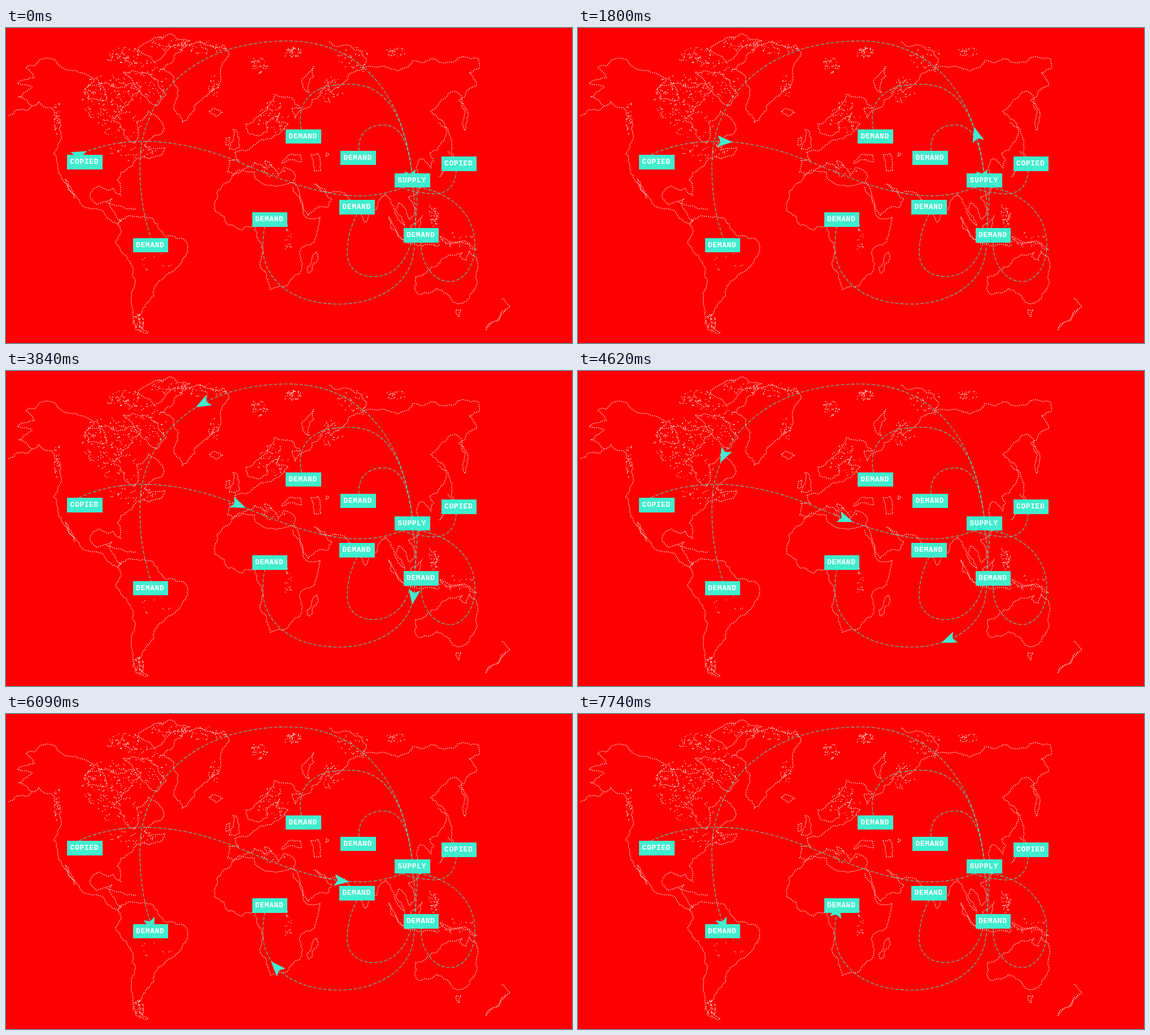
Recreate the animation shown at these times as an HTML page. Size 1002 by 559 pixels, loop 9 s.

```html
<!DOCTYPE html>
<html lang="en">
<head>
<meta charset="utf-8">
<title>Supply and demand map</title>
<style>
html, body { margin: 0; width: 100%; height: 100%; overflow: hidden; background: #f00; }
#stage { position: relative; width: 1002px; height: 559px; overflow: hidden; background: #f00; }
svg { position: absolute; left: 0; top: 0; }
#map { fill: none; stroke: #fff0df; stroke-width: 1.3; stroke-dasharray: 1.7 1.9; }
#specks { stroke-dasharray: none; }
#routes { fill: none; stroke: #48dcc0; stroke-width: 1.1; stroke-dasharray: 6 3; }
.arrow {
  position: absolute; left: 0; top: 0; width: 27px; height: 21px; background: #40edce;
  clip-path: polygon(100% 50%, 0 0, 21% 50%, 0 100%);
  animation: 9s linear infinite;
}
.label {
  position: absolute; width: 62.5px; height: 25.5px; background: #40edce; color: #fff;
  font: bold 13px/26px "Liberation Mono", monospace; letter-spacing: .6px;
  text-indent: 5.5px; white-space: nowrap;
}
#a1 { animation-name: west; }
#a2 { animation-name: north; }
#a3 { animation-name: south; }
@keyframes west {
  0%, .5% { offset-distance: 11px; }
  10.667% { offset-distance: 79.6px; }
  20% { offset-distance: 143.5px; }
  31% { offset-distance: 219px; }
  42.667% { offset-distance: 300.3px; }
  60.333% { offset-distance: 436.5px; }
  76% { offset-distance: 556.5px; }
  83% { offset-distance: 604px; }
  86%, 100% { offset-distance: 638px; }
}
@keyframes north {
  0%, 16% { offset-distance: 2px; }
  20% { offset-distance: 83px; }
  31% { offset-distance: 311px; }
  42.667% { offset-distance: 525px; }
  52.333% { offset-distance: 672px; }
  60.333% { offset-distance: 821px; }
  63.9%, 100% { offset-distance: 887px; }
}
@keyframes south {
  0%, 31.2% { offset-distance: 2px; }
  42.667% { offset-distance: 138px; }
  60.333% { offset-distance: 352px; }
  76% { offset-distance: 525px; }
  77.3%, 100% { offset-distance: 540px; }
}
</style>
</head>
<body>
<div id="stage">
<svg width="1002" height="559" viewBox="0 0 1002 559">
  <g id="map">
    <!-- North America -->
    <polyline points="4,156 38,146 46,138 22,122 46,105 20,99 50,88 35,70 86,56 94,66 148,86 232,98 238,110 206,140 190,165 228,205 232,165 252,147 280,180 246,210 281,212 278,220 240,228 215,250 197,270"/>
    <polyline points="197,270 203,297 190,284 165,280 152,290 150,303 160,313 188,303 184,315 195,335 205,342 198,348 132,312 105,268 122,303 93,258 98,190 82,142 58,130 46,138"/>
    <polyline points="178,309 207,317 230,321"/>
    <polygon points="232,42 258,22 295,12 326,22 280,48 262,62"/>
    <polygon points="208,78 240,80 284,118 268,138 240,118"/>
    <polygon points="140,108 172,104 178,128 146,126"/>
    <polygon points="272,74 300,45 345,25 385,30 395,45 380,70 375,105 335,135 312,168 297,145 305,110 297,85"/>
    <polygon points="360,148 370,143 383,150 372,157"/>
    <!-- South America -->
    <polygon points="198,348 215,334 245,335 268,348 285,370 318,378 322,388 308,420 285,437 262,475 247,490 235,530 252,541 230,535 222,490 225,430 194,380 204,360"/>
    <!-- Africa -->
    <polygon points="510,276 535,338 556,336 522,392 522,412 500,455 468,464 455,430 455,395 440,352 395,350 370,325 372,305 400,262 440,256 442,268 495,277"/>
    <polygon points="550,398 553,408 537,435 533,425"/>
    <!-- Europe -->
    <polygon points="395,215 413,212 410,185 402,180 402,200"/>
    <polygon points="390,196 396,193 396,206 389,208"/>
    <polyline points="510,275 512,261 492,248 482,262 458,235 462,250 440,238 402,260 392,255 395,235 411,235 405,220 452,198 482,189 500,170 478,165 485,150 460,170 462,184 452,190 428,185 425,170 445,158 475,118 507,124 522,142 506,142 512,160"/>
    <polygon points="488,240 500,225 522,225 523,238"/>
    <polygon points="540,225 552,222 558,253 545,254"/>
    <polygon points="567,222 572,224 566,228"/>
    <polygon points="545,68 523,95 537,115 535,100"/>
    <!-- Asia -->
    <polyline points="512,160 556,120 570,95 575,115 605,88 665,68 682,73 760,55 815,52 837,56 838,72 820,80 834,100 802,128 817,165 812,182 795,112 752,148 780,185 750,222"/>
    <polyline points="750,222 757,235 752,248 735,232 728,243 740,272 725,295 712,300 724,322 715,340 695,310 690,322 706,352 688,325 672,295 636,345 622,310 595,292 560,290 545,277 577,303 570,318 535,333 507,282"/>
    <polyline points="765,168 792,225 795,240 766,264 789,232 782,218"/>
    <polyline points="572,25 638,55 632,78"/>
    <!-- Islands and Oceania -->
    <polygon points="678,335 710,378 698,370"/>
    <polyline points="708,381 765,389"/>
    <polygon points="716,352 737,333 734,368 720,366"/>
    <polyline points="750,314 763,340 752,342"/>
    <polygon points="768,370 812,378 832,393 785,382"/>
    <polygon points="725,442 745,432 775,408 808,398 803,405 815,412 820,395 834,450 815,485 800,490 775,470 762,462 732,473 725,465"/>
    <polygon points="797,500 806,500 802,513"/>
    <polyline points="878,480 892,495 850,537 884,498"/>
    <path id="specks"/>
  </g>
  <g id="routes">
    <path id="r1" d="M121,229 C196,190 300,190 420,241 C530,288 620,318 705,282 C715,278 730,270 740,266"/>
    <path id="r2" d="M720,270 C706,112 622,23 500,23 C330,23 236,124 237,245 C237,300 245,340 261,386"/>
    <path id="r3" d="M717,264 C728,320 727,365 721,402 C712,460 650,490 590,490 C500,490 452,440 455,385 C455,370 457,352 462,338"/>
    <path d="M523,180 C512,130 545,100 600,100 C680,95 705,165 719,258"/>
    <path d="M625,218 C622,180 650,172 668,172 C700,172 712,205 719,258"/>
    <path d="M797,252 C796,285 775,297 750,294 S715,289 700,283"/>
    <path d="M730,283 C780,290 830,325 830,385 C830,425 808,450 786,450 C755,450 733,415 735,380"/>
    <path d="M622,330 C608,355 604,380 604,400 C605,428 625,441 650,441 C712,441 728,370 728,283"/>
  </g>
</svg>
<div class="arrow" id="a1"></div>
<div class="arrow" id="a2"></div>
<div class="arrow" id="a3"></div>
</div>
<script>
const stage = document.getElementById('stage');

let seed = 7;
function rand() {
  seed = (seed * 16807) % 2147483647;
  return seed / 2147483647;
}

// Split a segment at displaced midpoints until it looks like a coast.
function roughen(a, b, out) {
  const dx = b[0] - a[0], dy = b[1] - a[1];
  if (Math.hypot(dx, dy) < 5) { out.push(b); return; }
  const k = (rand() - .5) * .36;
  const mid = [(a[0] + b[0]) / 2 - dy * k, (a[1] + b[1]) / 2 + dx * k];
  roughen(a, mid, out);
  roughen(mid, b, out);
}

for (const coast of document.querySelectorAll('#map polyline, #map polygon')) {
  const pts = coast.getAttribute('points').split(' ').map(p => p.split(',').map(Number));
  if (coast.tagName === 'polygon') pts.push(pts[0]);
  const out = [pts[0]];
  for (let i = 1; i < pts.length; i++) roughen(pts[i - 1], pts[i], out);
  coast.setAttribute('points', out.map(p => p.map(v => v.toFixed(1))).join(' '));
}

// Small islands and lakes: centre, radii, count.
const clouds = [
  [210, 50, 34, 16, 80], [175, 125, 40, 45, 150], [245, 95, 40, 38, 90],
  [205, 175, 35, 30, 45], [225, 220, 45, 15, 45], [290, 27, 34, 14, 50],
  [350, 36, 40, 14, 50], [368, 103, 10, 22, 30], [90, 158, 5, 34, 35],
  [447, 67, 15, 15, 45], [508, 43, 16, 10, 45], [472, 158, 30, 28, 70],
  [575, 110, 22, 24, 40], [615, 52, 28, 20, 35], [690, 42, 18, 9, 30],
  [500, 375, 6, 26, 24], [757, 332, 9, 20, 30], [235, 525, 11, 18, 40],
  [265, 415, 28, 18, 12], [780, 375, 50, 15, 40], [470, 252, 24, 12, 24]
];
let d = '';
for (const [cx, cy, rx, ry, n] of clouds) {
  for (let i = 0; i < n; i++) {
    const turn = rand() * 2 * Math.PI, r = Math.sqrt(rand());
    const x = cx + rx * r * Math.cos(turn), y = cy + ry * r * Math.sin(turn);
    d += `M${x.toFixed(1)},${y.toFixed(1)}l${(rand() * 4 - 2).toFixed(1)},${(rand() * 3 - 1).toFixed(1)}`;
  }
}
document.getElementById('specks').setAttribute('d', d);

for (const n of [1, 2, 3]) {
  const route = document.getElementById('r' + n).getAttribute('d');
  document.getElementById('a' + n).style.offsetPath = `path("${route}")`;
}

const labels = [
  ['COPIED', 108, 225], ['DEMAND', 495, 179.5], ['DEMAND', 592, 217.5],
  ['COPIED', 770.5, 228], ['SUPPLY', 688, 257.5], ['DEMAND', 590, 305],
  ['DEMAND', 435.5, 327], ['DEMAND', 703.5, 355], ['DEMAND', 224.5, 372.5]
];
for (const [text, x, y] of labels) {
  const box = document.createElement('div');
  box.className = 'label';
  box.textContent = text;
  box.style.left = x + 'px';
  box.style.top = y + 'px';
  stage.append(box);
}
</script>
</body>
</html>
```
